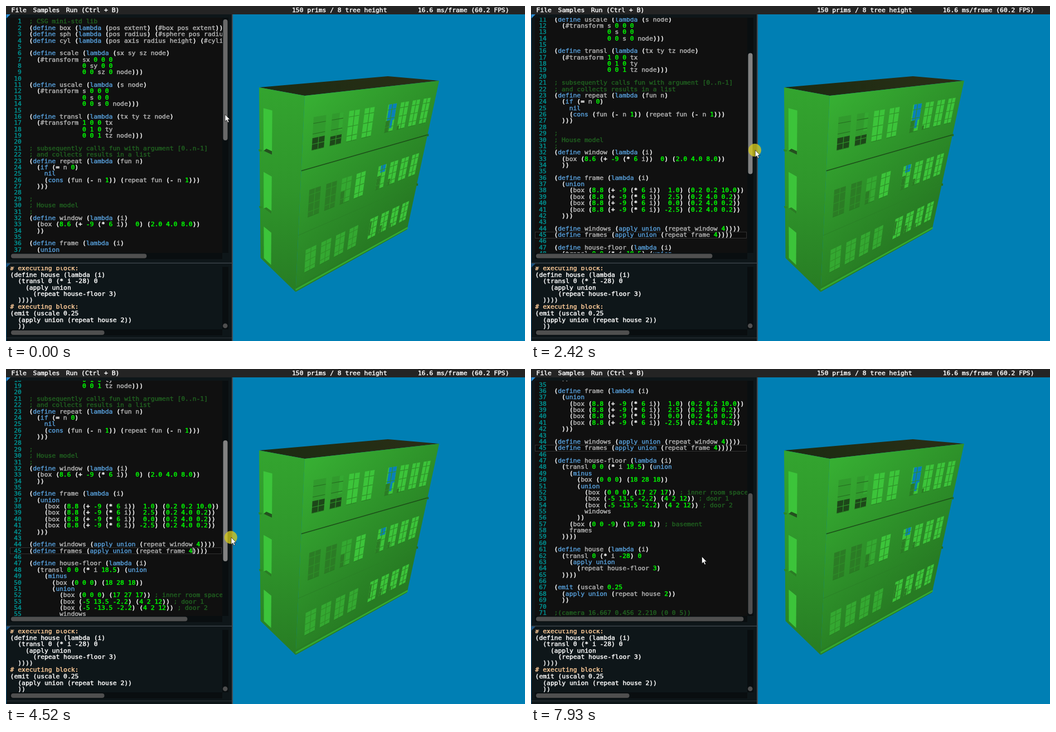
Recreate the animation shown at these times as an HTML page with a canvas. Size 931 by 601 pixels, loop 8000 ms.

```html
<!DOCTYPE html>
<html>
<head>
<meta charset="utf-8">
<title>CSG editor</title>
<style>
html, body { margin: 0; width: 100%; height: 100%; overflow: hidden; background: #007fb4; }
canvas { display: block; }
</style>
</head>
<body>
<canvas id="stage" width="931" height="601"></canvas>
<script>
const ctx = document.getElementById('stage').getContext('2d');
const LOOP = 8000, CHAR = 6.82, ROW = 11.37;
const FONT = '11.33px "DejaVu Sans Mono", monospace';

const SOURCE = `; CSG mini-std lib
(define box (lambda (pos extent) (#box pos extent)))
(define sph (lambda (pos radius) (#sphere pos radius)))
(define cyl (lambda (pos axis radius height) (#cylinder pos axis radius height)))

(define scale (lambda (sx sy sz node)
  (#transform sx 0 0 0
              0 sy 0 0
              0 0 sz 0 node)))

(define uscale (lambda (s node)
  (#transform s 0 0 0
              0 s 0 0
              0 0 s 0 node)))

(define transl (lambda (tx ty tz node)
  (#transform 1 0 0 tx
              0 1 0 ty
              0 0 1 tz node)))

; subsequently calls fun with argument [0..n-1]
; and collects results in a list
(define repeat (lambda (fun n)
  (if (= n 0)
    nil
    (cons (fun (- n 1)) (repeat fun (- n 1)))
  )))

;
; House model
;
(define window (lambda (i)
  (box (8.6 (+ -9 (* 6 i))  0) (2.0 4.0 8.0))
  ))

(define frame (lambda (i)
  (union
    (box (8.8 (+ -9 (* 6 i))  1.0) (0.2 0.2 10.0))
    (box (8.8 (+ -9 (* 6 i))  2.5) (0.2 4.0 0.2))
    (box (8.8 (+ -9 (* 6 i))  0.0) (0.2 4.0 0.2))
    (box (8.8 (+ -9 (* 6 i)) -2.5) (0.2 4.0 0.2))
  )))

(define windows (apply union (repeat window 4))))
(define frames (apply union (repeat frame 4))))

(define house-floor (lambda (i)
  (transl 0 0 (* i 18.5) (union
    (minus
      (box (0 0 0) (18 28 18))
      (union
        (box (0 0 0) (17 27 17)) ; inner room space
        (box (-5 13.5 -2.2) (4 2 12)) ; door 1
        (box (-5 -13.5 -2.2) (4 2 12)) ; door 2
        windows
      ))
    (box (0 0 -9) (19 28 1)) ; basement
    frames
  ))))

(define house (lambda (i)
  (transl 0 (* i -28) 0
    (apply union
      (repeat house-floor 3)
  ))))

(emit (uscale 0.25
  (apply union (repeat house 2))
  ))

;(camera 16.667 0.456 2.210 (0 0 5))`.split('\n');

const LOG = `# executing block:
(define house (lambda (i)
  (transl 0 (* i -28) 0
    (apply union
      (repeat house-floor 3)
  ))))
# executing block:
(emit (uscale 0.25
  (apply union (repeat house 2))
  ))`.split('\n');

const KEYWORDS = new Set('define lambda if nil cons apply union minus emit'.split(' '));
const TOKEN = /;.*|-?\d[\d.]*|#?[a-z][\w-]*|\S/g;

function tokenColor(s) {
  if (s[0] === ';') return '#206020';
  if (/^-?\d/.test(s)) return '#00ff00';
  if (KEYWORDS.has(s)) return '#569cd6';
  return /^#?[a-z]/.test(s) ? '#b4b4b4' : '#ffffff';
}

const TOKENS = SOURCE.map(line =>
  [...line.matchAll(TOKEN)].map(m => ({ col: m.index, s: m[0], color: tokenColor(m[0]) })));

// time/value pairs, linear between
function track(keys, t) {
  if (t <= keys[0][0]) return keys[0][1];
  for (let i = 1; i < keys.length; i++) {
    const [t0, v0] = keys[i - 1], [t1, v1] = keys[i];
    if (t <= t1) return v0 + (v1 - v0) * (t - t0) / (t1 - t0);
  }
  return keys[keys.length - 1][1];
}

const SCROLL = [[900, 0], [1120, 8], [1620, 54.4], [2420, 117.6], [3720, 178.4], [4520, 202],
  [5180, 231.6], [7180, 231.6], [7930, 386.4]];
const DRAG_X = [[0, 393], [270, 393], [900, 397], [1620, 400.7], [2420, 402.2], [3720, 403.6], [4520, 404], [5250, 403]];
const PRESS = 900, RELEASE = 5250, THUMB_RATE = 199 / 386.4;

const STEPS = [[0, 270], [270, 93.75], [1020, 100], [5580, 60.8], [6410, 70], [7240, 86.25]];
function snap(t) {
  const [start, len] = STEPS.filter(s => s[0] <= t).pop();
  return start + Math.floor((t - start) / len + 1e-6) * len;
}

const mix = (a, b, k) => a + (b - a) * k;

function pointer(t, scroll) {
  if (t < PRESS) return [track(DRAG_X, t), track([[270, 194.5], [PRESS, 198]], t)];
  if (t < RELEASE) return [track(DRAG_X, t), 198 + scroll * THUMB_RATE];
  if (t < 5480) return [track([[RELEASE, 403], [5480, 386.5]], t), track([[RELEASE, 317], [5480, 306]], t)];
  if (t < 7180) {
    // two sweeps around the model
    const u = (t - 5480) / 1700, a = Math.PI * (1 + 4 * u);
    const x = 520 + 191 * Math.cos(a), y = 230 + 227 * Math.sin(a);
    const near = Math.max(0, 1 - u * 12), end = Math.max(0, 1 - (1 - u) * 12);
    return [mix(mix(x, 386.5, near), 329, end), mix(mix(y, 306, near), 330, end)];
  }
  return [track([[7180, 329], [7500, 306.5]], t), track([[7180, 330], [7500, 336.5]], t)];
}

function rect(x, y, w, h, color) {
  ctx.fillStyle = color;
  ctx.fillRect(x, y, w, h);
}

function pill(x, y, w, h, color) {
  ctx.fillStyle = color;
  ctx.beginPath();
  ctx.roundRect(x, y, w, h, Math.min(w, h) / 2);
  ctx.fill();
}

// A thin outline gives the glyphs full-strength strokes
function text(s, x, y, color) {
  ctx.fillStyle = ctx.strokeStyle = color;
  ctx.lineWidth = 0.45;
  ctx.fillText(s, x, y);
  ctx.strokeText(s, x, y);
}

function clipped(x, y, w, h, draw) {
  ctx.save();
  ctx.beginPath();
  ctx.rect(x, y, w, h);
  ctx.clip();
  draw();
  ctx.restore();
}

function poly(points, color) {
  ctx.fillStyle = color;
  ctx.beginPath();
  points.forEach(p => ctx.lineTo(p[0], p[1]));
  ctx.closePath();
  ctx.fill();
}

function line(a, b, width, color) {
  ctx.strokeStyle = color;
  ctx.lineWidth = width;
  ctx.beginPath();
  ctx.moveTo(a[0], a[1]);
  ctx.lineTo(b[0], b[1]);
  ctx.stroke();
}

function gradient(a, b, ...colors) {
  const g = ctx.createLinearGradient(a[0], a[1], b[0], b[1]);
  colors.forEach((c, i) => g.addColorStop(i / (colors.length - 1), c));
  return g;
}

// Perspective map from wall units to the screen; corners TL, TR, BR, BL
function wall(corners, width, height) {
  const [[x0, y0], [x1, y1], [x2, y2], [x3, y3]] = corners;
  const sx = x0 - x1 + x2 - x3, sy = y0 - y1 + y2 - y3;
  const ax = x1 - x2, ay = y1 - y2, bx = x3 - x2, by = y3 - y2;
  const det = ax * by - bx * ay;
  const g = (sx * by - bx * sy) / det, h = (ax * sy - sx * ay) / det;
  return (x, z) => {
    const u = x / width, v = z / height, w = 1 + g * u + h * v;
    return [
      ((x1 - x0 + g * x1) * u + (x3 - x0 + h * x3) * v + x0) / w,
      ((y1 - y0 + g * y1) * u + (y3 - y0 + h * y3) * v + y0) / w
    ];
  };
}

const HEIGHT = 55.5, FLOOR = 18.5;
const TOP_LEFT = [454, 146], TOP_CORNER = [536, 161], TOP_RIGHT = [777, 134];
const LOW_LEFT = [456.5, 452], LOW_CORNER = [519.5, 513], LOW_RIGHT = [719.5, 401];
const front = wall([TOP_CORNER, TOP_RIGHT, LOW_RIGHT, LOW_CORNER], 56, HEIGHT);
const side = wall([TOP_LEFT, TOP_CORNER, LOW_CORNER, LOW_LEFT], 18, HEIGHT);

function patch(map, x0, z0, x1, z1, color) {
  poly([map(x0, z0), map(x1, z0), map(x1, z1), map(x0, z1)], color);
}

const BRIGHT = '#3cc43a', LIT = '#34a831', DIM = '#2b7c25', DARK = '#1d4719', SKY = '#0a80b8', BAR = '#2f9029';
const GLASS = [
  ['#319a2d', '#319a2d', BRIGHT, BRIGHT, BRIGHT, BRIGHT, BRIGHT, BRIGHT],
  [DIM, DIM, LIT, BRIGHT, BRIGHT, BRIGHT, BRIGHT, BRIGHT],
  [LIT, LIT, LIT, LIT, BRIGHT, BRIGHT, BRIGHT, BRIGHT]
];
// floor, window, then a box inside the window in units of 4 by 8
const SHADES = [
  [0, 0, 0, 5, 4, 8, DARK], [0, 1, 0, 5.6, 4, 8, DARK], [0, 1, 2.6, 0, 4, 4.6, LIT],
  [0, 4, 0.4, 0, 4, 4.6, SKY], [0, 4, 1.6, 4.6, 3.2, 7, SKY], [0, 4, 0, 4.6, 1.8, 8, DIM], [0, 5, 0, 6.8, 1, 8, DIM],
  [1, 2, 0, 4, 1.6, 8, DIM],
  [1, 4, 1.2, 0, 3.6, 2.4, SKY], [1, 4, 0, 3.4, 1.8, 8, DIM], [1, 5, 0, 5.8, 1.4, 8, DIM],
  [2, 4, 0, 1, 1, 6.5, DIM], [2, 5, 0, 4.8, 1.3, 8, DIM], [2, 6, 0, 6, 1, 8, DIM]
];

function drawWindow(floor, i) {
  const x = 3 + 6 * i + (i > 3 ? 4 : 0), z = 5 + FLOOR * floor;
  patch(front, x, z, x + 4, z + 8, GLASS[floor][i]);
  for (const [f, n, x0, z0, x1, z1, color] of SHADES)
    if (f === floor && n === i) patch(front, x + x0, z + z0, x + x1, z + z1, color);
  // the first two panes upstairs blend with the wall, only shadows show
  const flush = floor === 0 && i < 2;
  line(front(x + 2, z + (flush ? 5 : 0)), front(x + 2, z + 8), 1.2, BAR);
  for (const dz of [1.5, 4, 6.5])
    line(front(x, z + dz), front(x + 4, z + dz), 1.1, flush && dz < 5 ? '#256d20' : BAR);
  line(front(x, z + 8), front(x + 4, z + 8), 0.9, '#287522');
}

function drawHouse() {
  poly([TOP_LEFT, [685, 126], TOP_RIGHT, TOP_CORNER], gradient([470, 150], [770, 130], '#1c2b12', '#232d14', '#2a2e17'));
  poly([TOP_LEFT, TOP_CORNER, LOW_CORNER, LOW_LEFT], gradient([490, 150], [490, 500], '#33a42f', '#2f962b', '#287e24'));
  poly([TOP_CORNER, TOP_RIGHT, LOW_RIGHT, LOW_CORNER], gradient([536, 161], [726, 351], '#37b033', '#2f962b', '#277b23'));
  for (let f = 0; f < 3; f++) {
    const z = f * FLOOR;
    patch(side, 2, z + 5.2, 6, z + 17.2, BRIGHT);
    if (f < 2) poly([side(2, z + 17.2), side(3.4, z + 16.2), side(6, z + 16.2), side(6, z + 17.2)], f ? DIM : '#24501f');
    for (let i = 0; i < 8; i++) drawWindow(f, i);
  }
  // floor ledges
  line(front(0, 17.6), front(56.4, 17.6), 1.6, '#1c4f19');
  line(front(0, 36), front(56.4, 36), 1, '#2a8126');
  line(front(0, 53.8), front(56, 53.8), 1, '#277823');
  line(front(0, 54.7), front(56.2, 54.7), 2.6, '#35aa31');
  for (const z of [17.5, 36]) {
    const [x, y] = side(0, z);
    poly([[x - 2, y - 1], [x + 4, y], [x + 4, y + 3], [x - 1, y + 3]], '#2b8927');
    const [rx, ry] = front(56, z);
    rect(rx - 1, ry - 1, 3, 4, '#256d20');
  }
}

function drawEditor(t, scroll) {
  clipped(7, 21, 381, 422, () => {
    rect(7, 21, 381, 422, '#101010');
    const top = 22 + 44 * ROW - scroll;
    rect(7, top, 380, ROW, 'rgba(0,0,0,.25)');
    ctx.strokeStyle = 'rgba(160,160,160,.25)';
    ctx.lineWidth = 1;
    ctx.strokeRect(7.5, Math.round(top) + 0.5, 379, 11);
    TOKENS.forEach((tokens, i) => {
      const y = 31.4 + i * ROW - scroll;
      if (y < 15 || y > 460) return;
      text(String(i + 1).padStart(2), 14.3, y, '#009090');
      for (const k of tokens) text(k.s, 41.4 + k.col * CHAR, y, k.color);
    });
    if (t % 1200 >= 780) rect(335, top, 1, ROW, '#e0e0e0');
  });
  const longest = scroll < 46 ? 81 : scroll < 319 ? 61 : 51;
  rect(388, 21, 11, 422, '#090e10');
  rect(7, 443, 381, 11, '#090e10');
  const dragged = t >= PRESS && t < RELEASE;
  pill(389.5, 24 + scroll * THUMB_RATE, 8, 217, dragged ? '#828282' : t < PRESS ? '#696969' : '#4f4f4f');
  pill(9, 444.5, 379 * 379 / (38 + longest * CHAR), 8, '#4f4f4f');
}

function drawLog() {
  const rowY = i => i === 0 ? 474 : i < 6 ? 485.8 + (i - 1) * ROW : i === 6 ? 543.4 : 555.4 + (i - 7) * ROW;
  rect(388, 468, 11, 112, '#090e10');
  rect(7, 580, 381, 11, '#090e10');
  clipped(7, 468, 381, 112, () =>
    LOG.forEach((s, i) => text(s, 7.6, rowY(i), s[0] === '#' ? '#ffcc99' : '#ffffff')));
  pill(389, 569.5, 8.5, 8.5, '#4f4f4f');
  pill(9, 582, 167.5, 8, '#4f4f4f');
}

function drawPanels() {
  rect(0, 15, 1, 586, '#0a4a70');
  rect(1, 15, 405, 586, '#0e1619');
  rect(1, 460.5, 404, 1.5, '#3a4248');
  rect(1, 595, 404, 1, '#2b3338');
  rect(405, 15, 2, 586, '#3f4a52');
  poly([[1, 15], [8, 15], [1, 22]], '#2d8fd8');
  poly([[1, 462], [8, 462], [1, 469]], '#1d527f');
}

function drawMenu(t) {
  rect(0, 0, 931, 15, '#242424');
  const fps = t >= 3120 && t < 3320 ? '60.1' : '60.2';
  text('File', 9.6, 11.4, '#ffffff');
  text('Samples', 48.6, 11.4, '#ffffff');
  text('Run (Ctrl + B)', 107.8, 11.4, '#ffffff');
  text('150 prims / 8 tree height', 513, 11.4, '#ffffff');
  text(`16.6 ms/frame (${fps} FPS)`, 738.8, 11.4, '#ffffff');
}

function drawPointer(t, scroll) {
  const [x, y] = pointer(t, scroll);
  if (t >= PRESS && t < RELEASE) {
    ctx.fillStyle = 'rgba(215,203,28,.77)';
    ctx.beginPath();
    ctx.arc(x - 0.7, y, 11.5, 0, Math.PI * 2);
    ctx.fill();
  }
  const arrow = [[0, 0], [0, 12.6], [2.9, 10], [4.9, 14.6], [7, 13.7], [5, 9.2], [8.8, 9.2]];
  poly(arrow.map(p => [x + p[0], y + p[1]]), '#ffffff');
  ctx.strokeStyle = 'rgba(0,0,0,.8)';
  ctx.lineWidth = 0.8;
  ctx.stroke();
}

let shown = -1;
function frame(now) {
  const t = snap(now % LOOP);
  if (t !== shown) {
    shown = t;
    const scroll = track(SCROLL, t);
    ctx.font = FONT;
    ctx.lineJoin = 'round';
    rect(0, 0, 931, 601, '#007fb4');
    drawHouse();
    drawPanels();
    drawEditor(t, scroll);
    drawLog();
    drawMenu(t);
    drawPointer(t, scroll);
  }
  requestAnimationFrame(frame);
}
requestAnimationFrame(frame);
</script>
</body>
</html>
```
